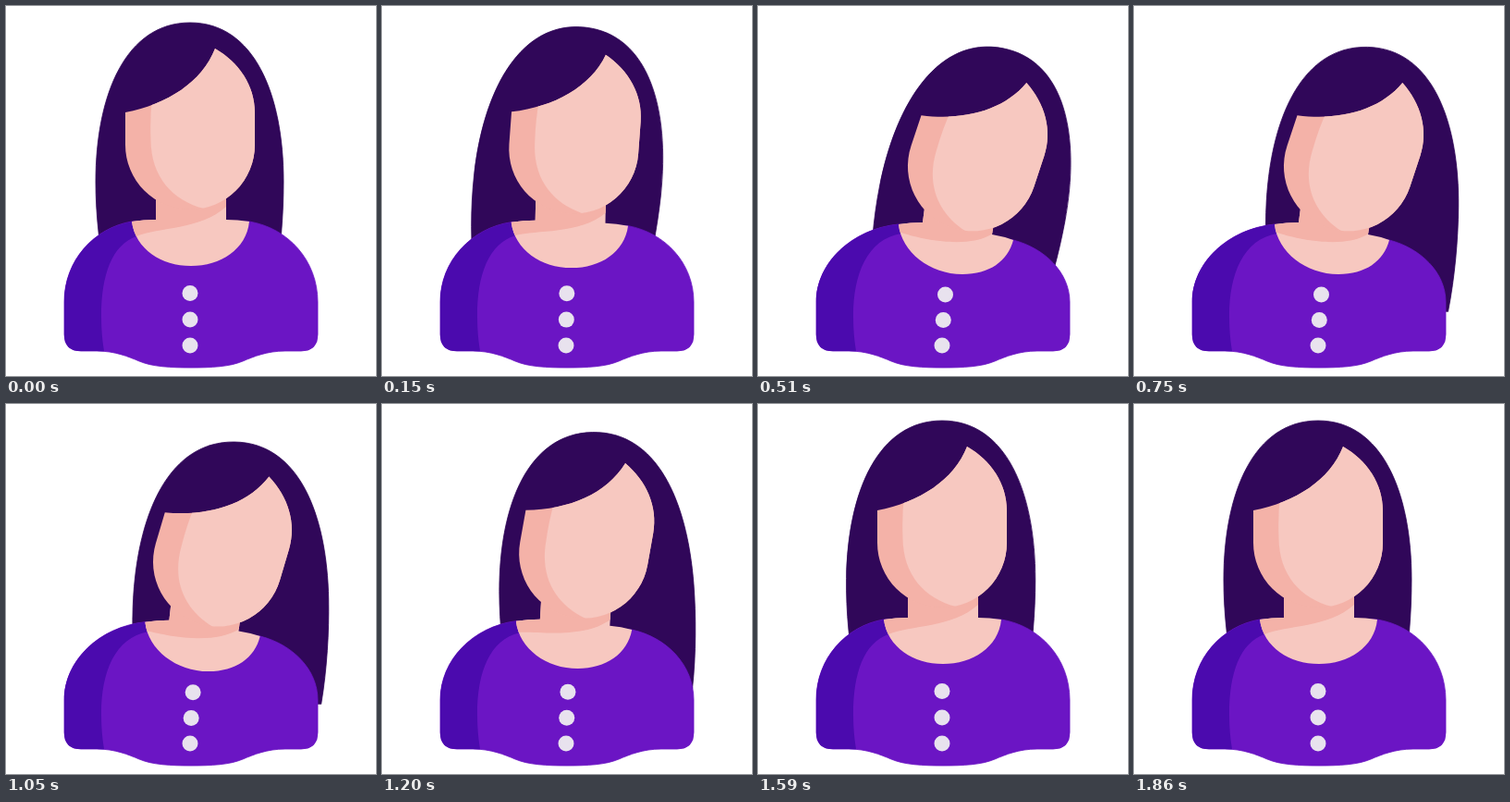
An HTML page with a canvas that plays this animation: 400x400 px, repeating every 3890 ms.

```html
<!DOCTYPE html>
<html lang="en">
<head>
<meta charset="utf-8">
<title>Avatar</title>
<style>
  html, body { margin: 0; width: 100%; height: 100%; overflow: hidden; background: #fff; }
  canvas { display: block; width: 100vmin; height: 100vmin; }
</style>
</head>
<body>
<canvas id="stage"></canvas>
<script>
const LOOP = 3890, STEP = 30, SIZE = 400;
const HAIR = '#300759', LIGHT = '#f7c8c0', SHADE = '#f4b2a8';
const SHIRT = '#6b15c4', SLEEVE = '#4b0aae', BUTTON = '#e8e2ee';

// Head rotates about NECK; hair swings about CROWN, which rides on the head.
const NECK = [143, 264], CROWN = [199, 90], MAX_TILT = 18.3;

// Keyframes: [time in ms, value]. Hair swings less at the root than at the tip.
const LEAN = [[0, 0], [480, 1], [940, 1], [1500, 0]];
const ROOT = [[0, 0], [340, 15], [800, 0.8], [1015, 0.8], [1420, -3.5], [1660, 1], [1860, 0]];
const TIP = [[0, 0], [340, 15], [800, 1.5], [1015, 1.5], [1420, -7], [1660, 2.4], [1860, 0]];
const SPREAD = [[0, 0], [400, 0], [800, 1.4], [1100, 2.4], [1500, 0.6], [1700, 0]];

// Upright and leaning versions of each bending shape share one structure.
const shirt = [
  'M136 233 C95 240 63 275 63 320 L63 355 Q63 373 81 373 L98 373 C118 373 132 379 144 384 ' +
  'C158 390 178 391 200 391 C222 391 242 390 256 384 C268 379 282 373 302 373 L319 373 ' +
  'Q337 373 337 355 L337 320 C337 275 305 240 263 233 Z',
  'M152 236 C101 241 63 278 63 320 L63 355 Q63 373 81 373 L98 373 C118 373 132 379 144 384 ' +
  'C158 390 178 391 200 391 C222 391 242 390 256 384 C268 379 282 373 302 373 L319 373 ' +
  'Q337 373 337 355 L337 320 C337 288 310 262 276 253 Z'
];
const sleeve = [
  'M141 249 C115 258 103 290 103 335 C103 349 104 361 106 373 L106 380 L50 380 L50 225 L136 225 Z',
  'M155 246 C118 252 103 290 103 335 C103 349 104 361 106 373 L106 380 L50 380 L50 225 L152 225 Z'
];
const neck = [
  'M136 233 Q149 231 162 231 L162 202 L238 202 L238 231 Q250 231 263 233 ' +
  'C260 263 232 281 200 281 C168 281 140 263 136 233 Z',
  'M152 236 Q165 234 178 234 L180.5 215 L255 235 L253 247 Q265 249 276 253 ' +
  'C270 276 250 290 221 290 C186 290 155 266 152 236 Z'
];
const neckShade = [
  'M141 249 C165 239 210 242 238 217 L250 190 L130 190 L130 250 Z',
  'M155 245 C172 251 226 264 254 246 L266 206 L146 206 L146 250 Z'
];
const buttons = [[199, 310.5, 202.5, 312], [199, 339, 200.3, 339.5], [199, 367, 199, 367]];

const face = new Path2D('M129 115 C175 106 212 82 226 46 C252 61 269 86 269 115 L269 150 ' +
  'A70 70 0 0 1 129 150 Z');
const faceLight = new Path2D('M158 100 Q155.5 120 156.5 145 C157 185 180 210 214 219 ' +
  'L214 230 L280 230 L280 30 L158 30 Z');
const hair = 'M199 18 C268 18 300 95 300 190 C300 225 297 265 290 303 L110 303 ' +
  'C101 265 97 225 97 190 C97 95 130 18 199 18 Z';

const canvas = document.getElementById('stage');
const ctx = canvas.getContext('2d');
const mix = (a, b, k) => a + (b - a) * k;
const rad = deg => deg * Math.PI / 180;

function track(keys, t) {
  const i = keys.findIndex(k => k[0] > t);
  if (i < 0) return keys[keys.length - 1][1];
  const [t0, a] = keys[i - 1], [t1, b] = keys[i];
  const u = (t - t0) / (t1 - t0);
  return mix(a, b, u * u * (3 - 2 * u));
}

function blend([from, to], k) {
  const ends = to.match(/[\d.]+/g);
  let i = 0;
  return new Path2D(from.replace(/[\d.]+/g, n => mix(+n, +ends[i++], k).toFixed(3)));
}

function rotate([x, y], [cx, cy], deg) {
  const c = Math.cos(rad(deg)), s = Math.sin(rad(deg));
  return [cx + (x - cx) * c - (y - cy) * s, cy + (x - cx) * s + (y - cy) * c];
}

// The two sides of the hair part slightly towards their ends.
function hairPath(tilt, t) {
  const [hx, hy] = rotate(CROWN, NECK, tilt);
  const root = track(ROOT, t), tip = track(TIP, t), spread = track(SPREAD, t);
  return new Path2D(hair.replace(/(\d+) (\d+)/g, (_, x, y) => {
    const depth = Math.min(1, (y - 18) / 172);
    const side = Math.sign(x - CROWN[0]);
    const p = rotate([+x, +y], CROWN, mix(root, tip - side * spread, depth));
    return (p[0] + hx - CROWN[0]).toFixed(3) + ' ' + (p[1] + hy - CROWN[1]).toFixed(3);
  }));
}

function fill(path, color) {
  ctx.fillStyle = color;
  ctx.fill(path);
}

// A hairline in the fill colour keeps the outer silhouette crisp.
function outline(path, color) {
  ctx.strokeStyle = color;
  ctx.lineWidth = 0.8;
  ctx.stroke(path);
}

function layered(base, color, overlay, overlayColor) {
  fill(base, color);
  ctx.save();
  ctx.clip(base);
  fill(overlay, overlayColor);
  ctx.restore();
}

function draw(t) {
  const lean = track(LEAN, t), tilt = lean * MAX_TILT;
  ctx.fillStyle = '#fff';
  ctx.fillRect(0, 0, SIZE, SIZE);

  const hairShape = hairPath(tilt, t), shirtShape = blend(shirt, lean);
  fill(hairShape, HAIR);
  outline(hairShape, HAIR);
  outline(shirtShape, SHIRT);
  layered(shirtShape, SHIRT, blend(sleeve, lean), SLEEVE);
  layered(blend(neck, lean), LIGHT, blend(neckShade, lean), SHADE);

  ctx.save();
  ctx.translate(...NECK);
  ctx.rotate(rad(tilt));
  ctx.translate(-NECK[0], -NECK[1]);
  layered(face, SHADE, faceLight, LIGHT);
  ctx.restore();

  ctx.fillStyle = BUTTON;
  for (const [x0, y0, x1, y1] of buttons) {
    ctx.beginPath();
    ctx.arc(mix(x0, x1, lean), mix(y0, y1, lean), 8.5, 0, Math.PI * 2);
    ctx.fill();
  }
}

function frame() {
  const px = Math.round(Math.min(innerWidth, innerHeight) * (devicePixelRatio || 1));
  if (canvas.width !== px) canvas.width = canvas.height = px;
  ctx.setTransform(px / SIZE, 0, 0, px / SIZE, 0, 0);
  const t = performance.now() % LOOP;
  draw(Math.floor(t / STEP) * STEP);
  requestAnimationFrame(frame);
}
frame();
</script>
</body>
</html>
```
